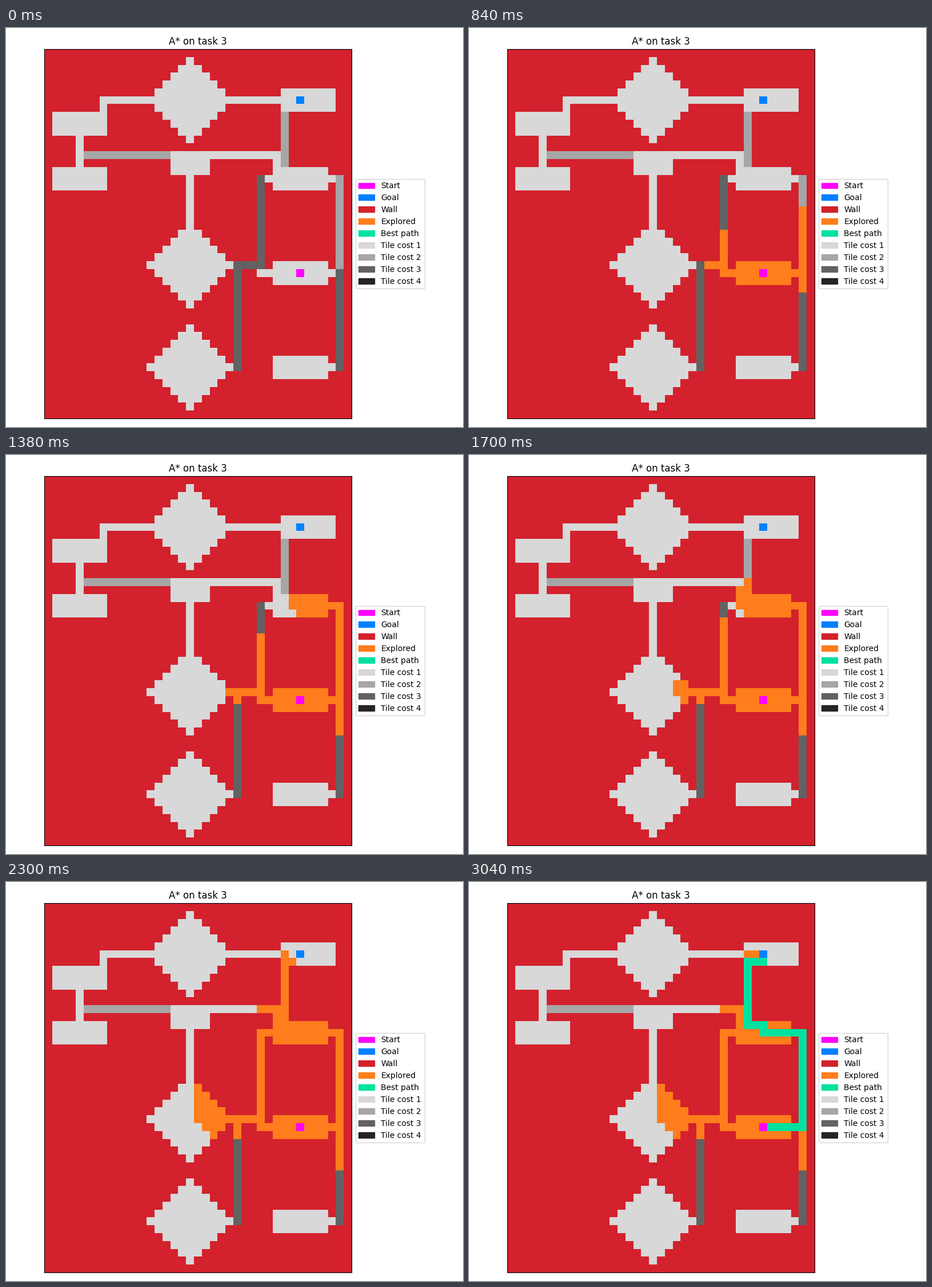
Animation, 800 px wide and 700 px high, one loop 4040 ms. Source, as a matplotlib script:

```python
import itertools

import numpy as np
import matplotlib.pyplot as plt
from matplotlib.animation import FuncAnimation
from matplotlib.colors import ListedColormap
from matplotlib.patches import Patch

W, H, DPI = 800, 700, 100
ROWS, COLS = 47, 39
STEP_MS, FRAMES = 20, 202
START, GOAL = (28, 32), (6, 32)
WALL, START_ID, GOAL_ID, EXPLORED, PATH = 0, 5, 6, 7, 8

# Colours by cell id: wall, tile costs 1-4, start, goal, explored, best path
COLORS = ["#d3212d", "#d8d8d8", "#a6a6a6", "#626262", "#242424",
          "#ff00ff", "#0080ff", "#ff7d1c", "#00e1a0"]
LEGEND = [("Start", START_ID), ("Goal", GOAL_ID), ("Wall", WALL),
          ("Explored", EXPLORED), ("Best path", PATH)]
LEGEND += [(f"Tile cost {k}", k) for k in range(1, 5)]


def build_map():
    grid = np.zeros((ROWS, COLS), int)

    def fill(r0, r1, c0, c1, cost=1):
        grid[r0:r1 + 1, c0:c1 + 1] = cost

    def room(r, c):
        fill(r, r + 2, c, c + 6)

    rr, cc = np.indices(grid.shape)
    for r in (6, 27, 40):
        grid[abs(rr - r) + abs(cc - 18) <= 5] = 1

    for r, c in ((8, 1), (15, 1), (5, 30), (15, 29), (27, 29), (39, 29)):
        room(r, c)
    fill(13, 15, 16, 20)

    # Corridors
    fill(6, 6, 7, 30)
    fill(6, 7, 7, 7)
    fill(13, 13, 5, 15, 2)
    fill(11, 14, 4, 4)
    fill(13, 13, 21, 29)
    fill(13, 14, 29, 29)
    fill(16, 22, 18, 18)
    fill(8, 14, 30, 30, 2)
    fill(16, 16, 28, 28)
    fill(28, 28, 27, 28)
    for r in (16, 28, 40):
        fill(r, r, 36, 36)
    fill(16, 27, 37, 37, 2)
    fill(28, 40, 37, 37, 3)
    fill(16, 27, 27, 27, 3)
    fill(27, 27, 24, 27, 3)
    fill(27, 40, 24, 24, 3)
    return grid


def a_star(grid):
    """Return the cells in order of expansion and the path back from the goal."""
    def h(cell):
        return abs(cell[0] - GOAL[0]) + abs(cell[1] - GOAL[1])

    tick = itertools.count()
    cost, parent = {START: 0}, {}
    queue = {START: (h(START), next(tick))}
    explored = []
    while queue:
        cell = min(queue, key=queue.get)
        del queue[cell]
        if cell == GOAL:
            break
        explored.append(cell)
        for dr, dc in ((0, 1), (1, 0), (0, -1), (-1, 0)):
            near = (cell[0] + dr, cell[1] + dc)
            if grid[near] == WALL:
                continue
            g = cost[cell] + grid[near]
            if near not in cost or g < cost[near]:
                cost[near], parent[near] = g, cell
                queue[near] = (g + h(near), next(tick))

    path, cell = [], parent[GOAL]
    while cell != START:
        path.append(cell)
        cell = parent[cell]
    return explored[1:], path


base = build_map()
explored, path = a_star(base)
base[START], base[GOAL] = START_ID, GOAL_ID
steps = [(c, EXPLORED) for c in explored] + [(c, PATH) for c in path]

fig = plt.figure(figsize=(W / DPI, H / DPI), dpi=DPI, facecolor="white")
ax = fig.add_axes([67.3 / W, 15.2 / H, 537.6 / W, 647.6 / H])
image = ax.imshow(base, cmap=ListedColormap(COLORS), vmin=-0.5,
                  vmax=len(COLORS) - 0.5, interpolation="nearest",
                  aspect="auto")
ax.set_xticks([])
ax.set_yticks([])
ax.set_title("A* on task 3", fontsize=12)
ax.legend(handles=[Patch(color=COLORS[k], label=name) for name, k in LEGEND],
          loc="center left", bbox_to_anchor=(1, 0.5), fontsize=10)


def draw(i):
    grid = base.copy()
    for cell, kind in steps[:max(0, i - 1)]:
        grid[cell] = kind
    image.set_data(grid)
    return [image]


anim = FuncAnimation(fig, draw, frames=FRAMES, interval=STEP_MS,
                     repeat=True, repeat_delay=0, blit=False)
plt.show()
```
